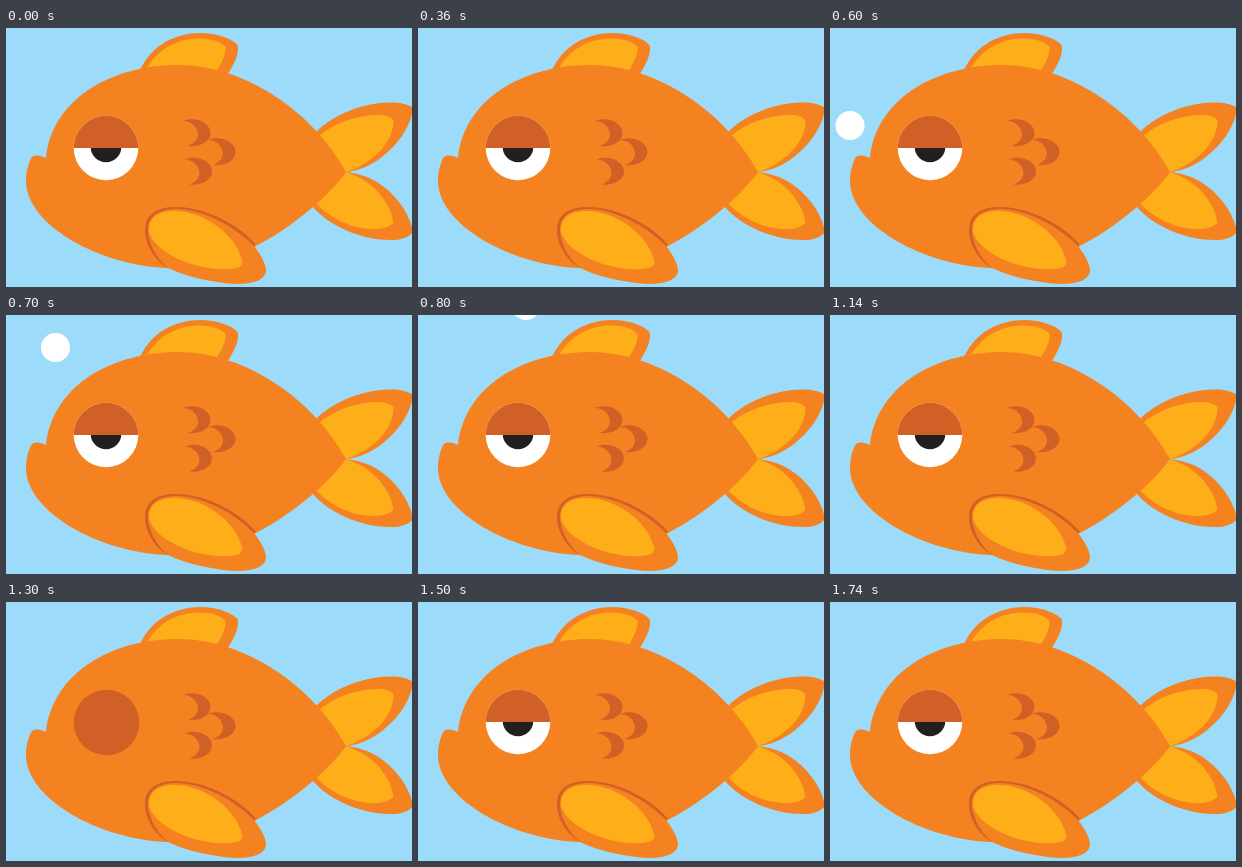
An HTML page that plays this animation: 406x259 px, repeating every 1900 ms.

```html
<!DOCTYPE html>
<html lang="en">
<head>
<meta charset="utf-8">
<title>Sleepy goldfish</title>
<style>
  html, body { margin: 0; width: 100%; height: 100%; overflow: hidden; background: #9cdcfa; }
  svg { display: block; width: 100%; height: 100%; }
  .orange { fill: #f58220; }
  .yellow { fill: #fdae19; }
  .brown { fill: #d16027; }
</style>
</head>
<body>
<svg viewBox="0 0 406 259">
  <defs>
    <path id="scale" d="M177 93C190 88 204.500 95 204.500 105C204.500 114 193 119.500 182 118C190 115 194 109 191 102C189 97 184 93 177 93Z"/>
  </defs>

  <!-- Back fin -->
  <path class="orange" d="M134 42C145 18 168 5 195 5C211 5 226 11 231.500 17C234 24 228 37 221 47L180 60Z"/>
  <path class="yellow" d="M140 42C151 21 171 10.500 194 10.500C206 10.500 215 14 219.500 19C220.500 26 215 36 210 44L180 60Z"/>

  <!-- Tail -->
  <path class="orange" d="M309 105C328 85 361 74 385 74.500C396 74.500 403 77 407 80C405 98 393 116 376 129C364 138 352 143 340 144Z"/>
  <path class="yellow" d="M312 109C327 95 351 87 373 87C380 87 384 89 387.500 92C388 106 379 121 365 131C357 137 348 142 340 144Z"/>
  <path class="orange" d="M306 178C324 199 356 212 385 212C396 212 403 209 407 204C404 186 390 166 371 154C361 148 350 145 340 144Z"/>
  <path class="yellow" d="M309 174C325 192 349 202 371 201C379 200.500 384 198 387.500 195C385 178 373 161 356 151C350 148 345 146 340 144Z"/>

  <!-- Body -->
  <path class="orange" d="M26 129C30 126.500 35 127.500 40 130C46 72 104 37 172 37C240 37 308 85 340 144C324 167 286 200 248 219C225 231 195 241 163 240C92 238 20 196 20 153C20 143 23 133 26 129Z"/>
  <g class="brown">
    <use href="#scale"/>
    <use href="#scale" x="25" y="19"/>
    <use href="#scale" x="1.500" y="38.500"/>
  </g>

  <!-- Side fin -->
  <path class="brown" d="M162 240C148 232 139 216 139 202C139 187 150 179 170 179C200 179 235 198 250 217L244 222Z"/>
  <path class="orange" d="M162 240C150 230 142 215 142 202C142 188 152 181 172 181C205 183 233 203 248 218C255 227 260 236 260 243C259 252 247 256 231 256C207 255 181 249 162 240Z"/>
  <path class="yellow" d="M143 204C142 190 152 183 168 183C200 183 230 208 236 232C237 236 235 239 230 240C201 246 151 229 143 204Z"/>

  <!-- Eye -->
  <g id="open">
    <circle cx="100" cy="120" r="32.300" fill="#fff"/>
    <circle cx="100" cy="119" r="15.300" fill="#231f20"/>
    <path class="brown" d="M67.700 120a32.300 32.300 0 0 1 64.600 0Z"/>
  </g>
  <circle id="closed" class="brown" cx="100.500" cy="120.500" r="32.800"/>

  <circle id="bubble" r="14.500" fill="#fff"/>
</svg>
<script>
  const LOOP = 1900;
  const BUBBLE_START = 600, BUBBLE_STEP = 100;
  const BLINK_START = 1300, BLINK_END = 1500;
  const bubblePath = [[20, 97.500], [49.500, 32.500], [108, -9.500]];

  const [open, closed, bubble] = ["open", "closed", "bubble"].map(id => document.getElementById(id));
  const show = (el, on) => el.setAttribute("visibility", on ? "visible" : "hidden");

  function draw() {
    const t = performance.now() % LOOP;
    const spot = bubblePath[Math.floor((t - BUBBLE_START) / BUBBLE_STEP)];
    show(bubble, spot);
    if (spot) bubble.setAttribute("transform", `translate(${spot})`);

    const blink = t >= BLINK_START && t < BLINK_END;
    show(open, !blink);
    show(closed, blink);
    requestAnimationFrame(draw);
  }
  draw();
</script>
</body>
</html>
```
